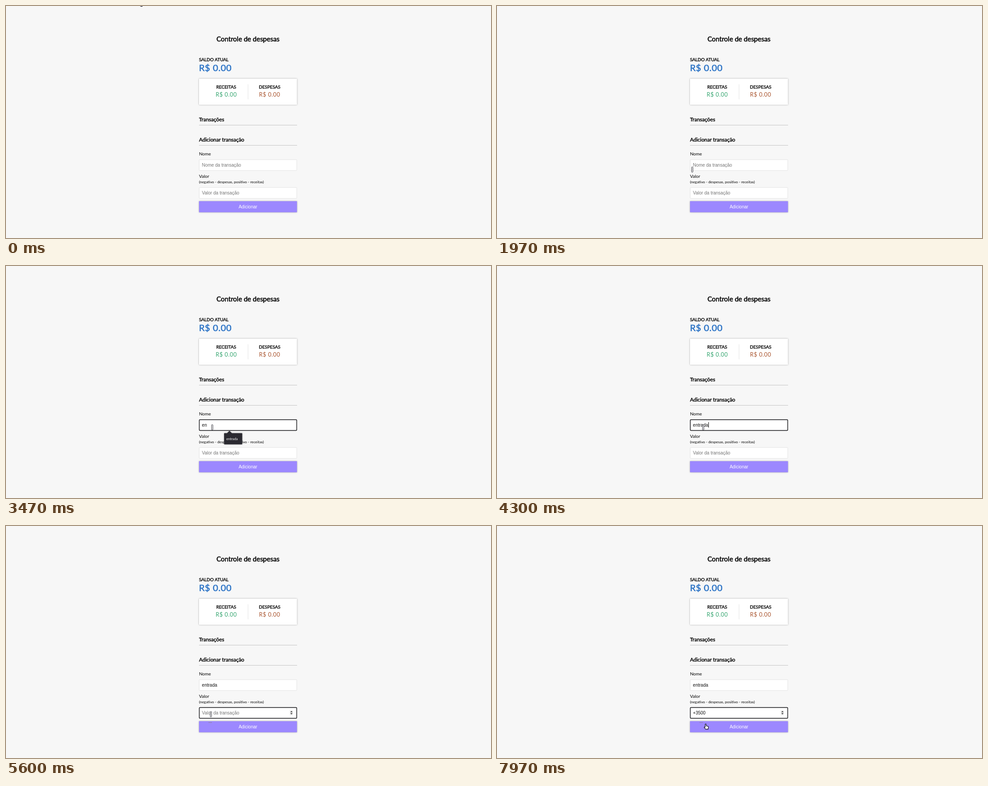
Animation of 1083 by 517 pixels, one loop 8000 ms. Source, as an HTML page:

```html
<!DOCTYPE html>
<html lang="pt-BR">
<head>
<meta charset="utf-8">
<title>Controle de despesas</title>
<style>
  html, body { margin: 0; width: 100%; height: 100%; overflow: hidden; background: #f7f7f7; }
  svg { display: block; font-family: Lato, sans-serif; }
  .heavy { stroke: currentColor; fill: currentColor; }
  .h1 { font-size: 20px; stroke-width: .64px; letter-spacing: .626px; color: #2d74c6; }
  .h2 { font-size: 15px; stroke-width: .53px; }
  .h3 { font-size: 11.7px; stroke-width: .43px; }
  .h4 { font-size: 10px; stroke-width: .39px; }
  .money { font-size: 12.5px; letter-spacing: .626px; }
  .label { font-size: 10px; }
  .small { font-size: 8.34px; }
  .input { font-size: 10px; font-family: "Liberation Sans", Arial, sans-serif; }
  .mid { text-anchor: middle; }
  .raised { filter: drop-shadow(0 .63px 1.9px rgba(0,0,0,.12)) drop-shadow(0 .63px 1.25px rgba(0,0,0,.24)); }
  .cursor { fill: #fff; stroke: #0b0b20; stroke-width: 1.2; stroke-linejoin: round; }
</style>
</head>
<body>
<svg width="1083" height="517" viewBox="0 0 1083 517">
  <text class="heavy h2 mid" x="540.3" y="79">Controle de despesas</text>
  <text class="heavy h4" x="430.9" y="123.2">SALDO ATUAL</text>
  <text class="heavy h1" x="430.9" y="145.4">R$ 0.00</text>

  <rect class="raised" x="431" y="162" width="218.7" height="58" fill="#fff"/>
  <rect x="540" y="174.5" width="1" height="33.5" fill="#e3e3e3"/>
  <text class="heavy h4 mid" x="491.7" y="184.2">RECEITAS</text>
  <text class="heavy h4 mid" x="588.7" y="184.2">DESPESAS</text>
  <text class="money mid" x="491.9" y="201.6" fill="#36a671">R$ 0.00</text>
  <text class="money mid" x="588.7" y="201.6" fill="#a9552f">R$ 0.00</text>

  <text class="heavy h3" x="430.9" y="256.6">Transações</text>
  <rect x="431" y="265" width="219" height="1" fill="#c4c4c4"/>
  <text class="heavy h3" x="430.9" y="302.1">Adicionar transação</text>
  <rect x="431" y="310" width="219" height="1" fill="#c4c4c4"/>

  <text class="label" x="430.9" y="333">Nome</text>
  <text class="label" x="430.9" y="383">Valor</text>
  <text class="small" x="430.9" y="394.7">(negativo - despesas, positivo - receitas)</text>
  <g id="fields"></g>
  <g id="spinner">
    <rect x="633.5" y="410" width="7" height="12" fill="#f1f1f1"/>
    <path d="M634.8 415l2.6-3 2.6 3zM634.8 417l2.6 3 2.6-3z" fill="#444"/>
  </g>

  <rect class="raised" x="431" y="435" width="218.7" height="24.7" fill="#9c88ff"/>
  <rect id="trace" x="452" y="437.4" width="8" height="1" fill="#8f8593"/>
  <text class="input mid" x="540.3" y="450.6" fill="#fff">Adicionar</text>

  <g id="popup">
    <path class="raised" d="M488.5 372.5H493.5L499 367.3 504.5 372.5H526.5q1 0 1 1V396.5q0 1-1 1H488q-1 0-1-1V373.5q0-1 1-1z" fill="#2b2a31"/>
    <text x="492" y="387.6" font-size="7.6" fill="#fff">entrada</text>
  </g>

  <path id="arrow" class="cursor" d="M.7 1.2Q1.4 .3 2.6 1L7.6 4.6Q8.6 5.4 7.9 6.6L7 8.6 4.6 10.3 1.6 9.8Q.7 9.6 .7 8.6Z"/>
  <rect id="beam" x="-1.5" y="-6" width="3" height="12" rx="1.2" fill="#f2f2f2" stroke="#3a3a42"/>
  <path id="hand" class="cursor" d="M-1.2 8V1.6Q0 -.4 1.2 1.6V5L5 5.8Q6.5 6.2 6.3 8L5.4 11.2V12.4H.2L-3.4 8.6Q-3.2 6.6 -1.2 8Z"/>
</svg>
<script>
const LOOP = 8000, BLINK = 530;
const byId = id => document.getElementById(id);
const show = (node, on) => node.setAttribute('visibility', on ? 'visible' : 'hidden');

// Pointer hotspot: [time, x, y]
const route = [
  [0, 299, -9.5], [160, 299, -9.5], [330, 252, 55], [530, 225, 165], [760, 268, 268],
  [950, 340, 334], [1000, 370, 349], [1070, 370, 349], [1350, 444, 366], [1800, 359, 354],
  [1860, 390, 362], [1970, 436, 364.5], [2080, 436, 364.5], [2300, 458, 360],
  [2520, 459, 359.5], [2570, 460.5, 359.5], [4300, 460.5, 359.5], [4560, 452, 429],
  [4770, 454, 426], [4890, 457.5, 419.5], [7860, 457.5, 419.5], [7970, 466, 440.5], [8000, 466, 440.5]
];

// Keystrokes: [time, value]
const fields = [
  { top: 342, hint: 'Nome da transação', focus: 2800, blur: 5050,
    keys: [[2850, 'e'], [2910, 'en'], [3810, 'ent'], [3970, 'entr'], [4030, 'entra'], [4090, 'entrad'], [4150, 'entrada']] },
  { top: 404, hint: 'Valor da transação', focus: 5050, blur: LOOP,
    keys: [[5760, '+'], [6320, '+3'], [6700, '+35'], [6980, '+350'], [7150, '+3500']] }
];

function add(name, attrs) {
  const node = document.createElementNS('http://www.w3.org/2000/svg', name);
  for (const key in attrs) node.setAttribute(key, attrs[key]);
  return byId('fields').appendChild(node);
}

for (const f of fields) {
  add('rect', { x: 431.4, y: f.top + .4, width: 217.9, height: 24.3, rx: 1, fill: '#fff', stroke: '#dedede', 'stroke-width': .8 });
  f.ring = add('rect', { x: 431.6, y: f.top + .5, width: 217.6, height: 24, rx: 1.5, fill: 'none', stroke: '#101014', 'stroke-width': 1.4 });
  f.text = add('text', { class: 'input', x: 437.6, y: f.top + 15.5 });
  f.caret = add('rect', { y: f.top + 6, width: 1, height: 12 });
}

function drawField(f, t) {
  const [pressed, value] = f.keys.filter(k => t >= k[0]).pop() || [f.focus, ''];
  const focused = t >= f.focus && t < f.blur;
  f.text.textContent = value || f.hint;
  f.text.setAttribute('fill', value ? '#111' : '#757575');
  show(f.ring, focused);
  show(f.caret, focused && (t - pressed) % (2 * BLINK) < BLINK);
  const width = value ? f.text.getComputedTextLength() : 0;
  f.caret.setAttribute('x', Math.round(437.6 + width));
}

function pointerAt(t) {
  const i = route.findIndex(p => p[0] > t);
  const [t0, x0, y0] = route[i - 1], [t1, x1, y1] = route[i];
  const k = (t - t0) / (t1 - t0);
  return [x0 + (x1 - x0) * k, y0 + (y1 - y0) * k];
}

function drawPointer(t) {
  const [x, y] = pointerAt(t);
  const inside = (top, bottom) => x >= 431 && y >= top && y < bottom;
  const kind = inside(342, 367) || inside(404, 429) ? 'beam' : inside(435, 460) ? 'hand' : 'arrow';
  for (const id of ['arrow', 'beam', 'hand']) show(byId(id), id === kind);
  byId(kind).setAttribute('transform', `translate(${x} ${y})`);
  show(byId('spinner'), t >= fields[1].focus || inside(404, 429));
}

function frame(now) {
  const t = now % LOOP;
  fields.forEach(f => drawField(f, t));
  drawPointer(t);
  show(byId('popup'), t >= 2850 && t < 4150);
  show(byId('trace'), t >= 4600);
  requestAnimationFrame(frame);
}
frame(0);
</script>
</body>
</html>
```
